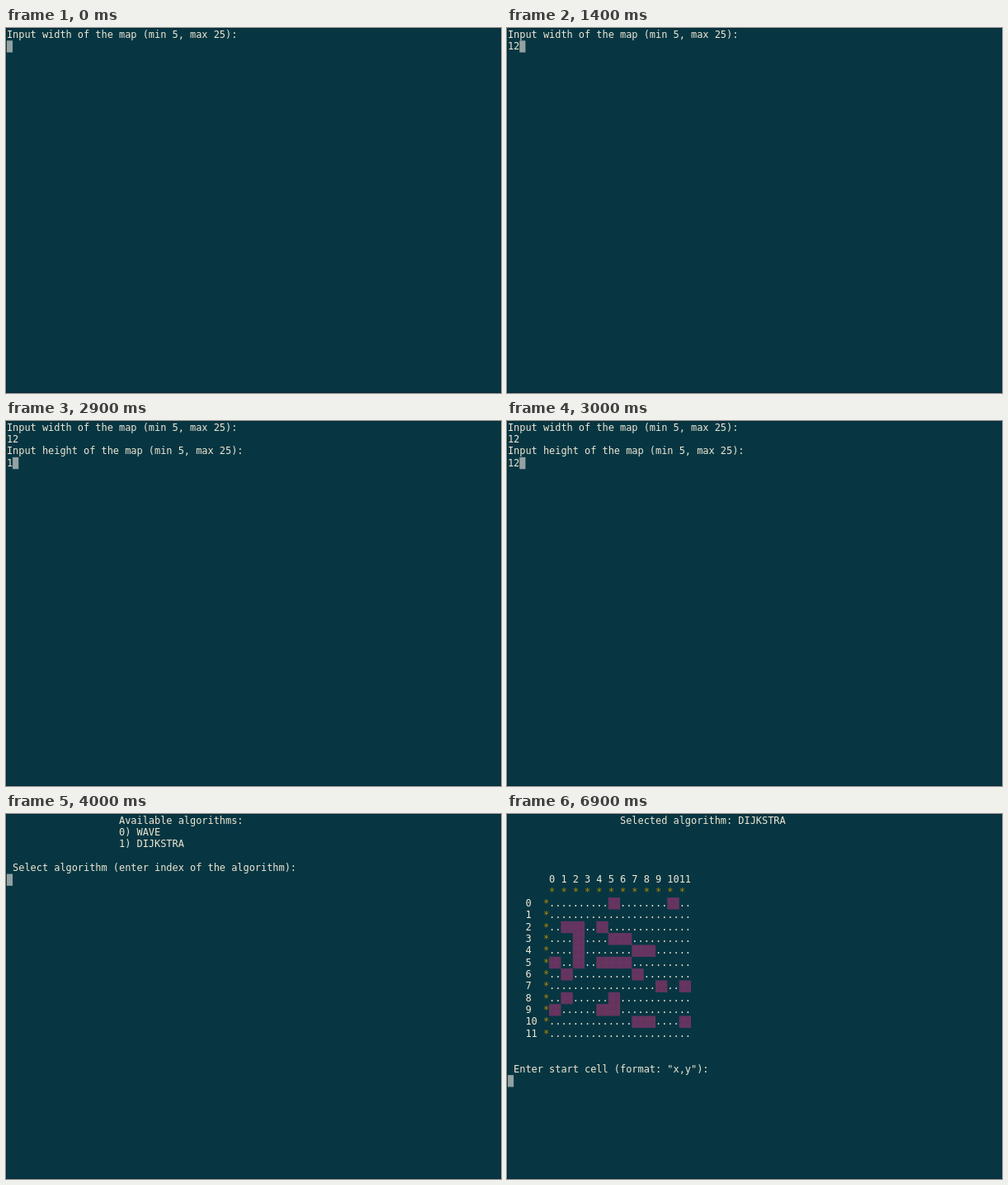
These frames come from a looping animation (600 by 442 pixels, 8 s). An HTML page with a canvas:

```html
<!DOCTYPE html>
<html lang="en">
<head>
<meta charset="utf-8">
<title>Path finder terminal</title>
<style>
  html, body { margin: 0; width: 100%; height: 100%; overflow: hidden; background: #073642; }
  canvas { display: block; }
</style>
</head>
<body>
<canvas id="term" width="600" height="442"></canvas>
<script>
const ctx = document.getElementById('term').getContext('2d');
const LOOP = 8000, SCALE = 0.8956, CELL_W = 8, CELL_H = 16, PAD = 1;
const BG = '#073642', EDGE = '#032b37', TEXT = '#eee8d5';
const CURSOR = '#93a1a1', STAR = '#b58900', WALL = '#d33682';

const MAP = [
  '.....#....#.',
  '............',
  '.##.#.......',
  '..#..##.....',
  '..#....##...',
  '#.#.###.....',
  '.#.....#....',
  '.........#.#',
  '.#...#......',
  '#...##......',
  '.......##..#',
  '............'
];

const left = col => PAD + col * CELL_W;
const top_ = row => PAD + row * CELL_H;

function print(row, col, text, color = TEXT) {
  ctx.fillStyle = color;
  [...text].forEach((ch, i) => {
    if (ch !== ' ') ctx.fillText(ch, left(col + i), top_(row) + 12.2);
  });
}

function cursor(row, col) {
  ctx.fillStyle = CURSOR;
  ctx.fillRect(left(col), top_(row), CELL_W, CELL_H);
}

// Half-tone block, two characters wide
function wall(row, col) {
  ctx.fillStyle = WALL;
  for (let y = 0; y < CELL_H; y++) {
    for (let x = y % 2; x < 2 * CELL_W; x += 2) {
      ctx.fillRect(left(col) + x, top_(row) + y, 1, 1);
    }
  }
}

function input(row, typed, active = true) {
  print(row, 0, typed);
  if (active) cursor(row, typed.length);
}

function askSize(width, height) {
  const asksHeight = height !== undefined;
  print(0, 0, 'Input width of the map (min 5, max 25):');
  input(1, width, !asksHeight);
  if (asksHeight) {
    print(2, 0, 'Input height of the map (min 5, max 25):');
    input(3, height);
  }
}

function askAlgorithm(typed) {
  print(0, 19, 'Available algorithms:');
  print(1, 19, '0) WAVE');
  print(2, 19, '1) DIJKSTRA');
  print(4, 1, 'Select algorithm (enter index of the algorithm):');
  input(5, typed);
}

function askStart() {
  print(0, 19, 'Selected algorithm: DIJKSTRA');
  MAP.forEach((line, r) => {
    print(5, 7 + 2 * r, String(r));
    print(6, 7 + 2 * r, '*', STAR);
    print(7 + r, 3, String(r));
    print(7 + r, 6, '*', STAR);
    [...line].forEach((cell, c) => {
      if (cell === '#') wall(7 + r, 7 + 2 * c);
      else print(7 + r, 7 + 2 * c, '..');
    });
  });
  print(21, 1, 'Enter start cell (format: "x,y"):');
  input(22, '');
}

const STEPS = [
  [0, () => askSize('')],
  [1200, () => askSize('1')],
  [1300, () => askSize('12')],
  [1900, () => askSize('12', '')],
  [2900, () => askSize('12', '1')],
  [3000, () => askSize('12', '12')],
  [3900, () => askAlgorithm('')],
  [5700, () => askAlgorithm('1')],
  [6900, askStart]
];

function draw(step) {
  ctx.setTransform(1, 0, 0, 1, 0, 0);
  ctx.fillStyle = BG;
  ctx.fillRect(0, 0, 600, 442);
  ctx.strokeStyle = EDGE;
  ctx.strokeRect(0.5, 0.5, 599, 441);
  ctx.scale(SCALE, SCALE);
  ctx.font = '13.333px "DejaVu Sans Mono", monospace';
  step[1]();
}

const start = performance.now();
let shown = null;

function tick() {
  const t = (performance.now() - start) % LOOP;
  const step = STEPS.filter(s => s[0] <= t).pop();
  if (step !== shown) draw(shown = step);
  requestAnimationFrame(tick);
}
tick();
</script>
</body>
</html>
```
